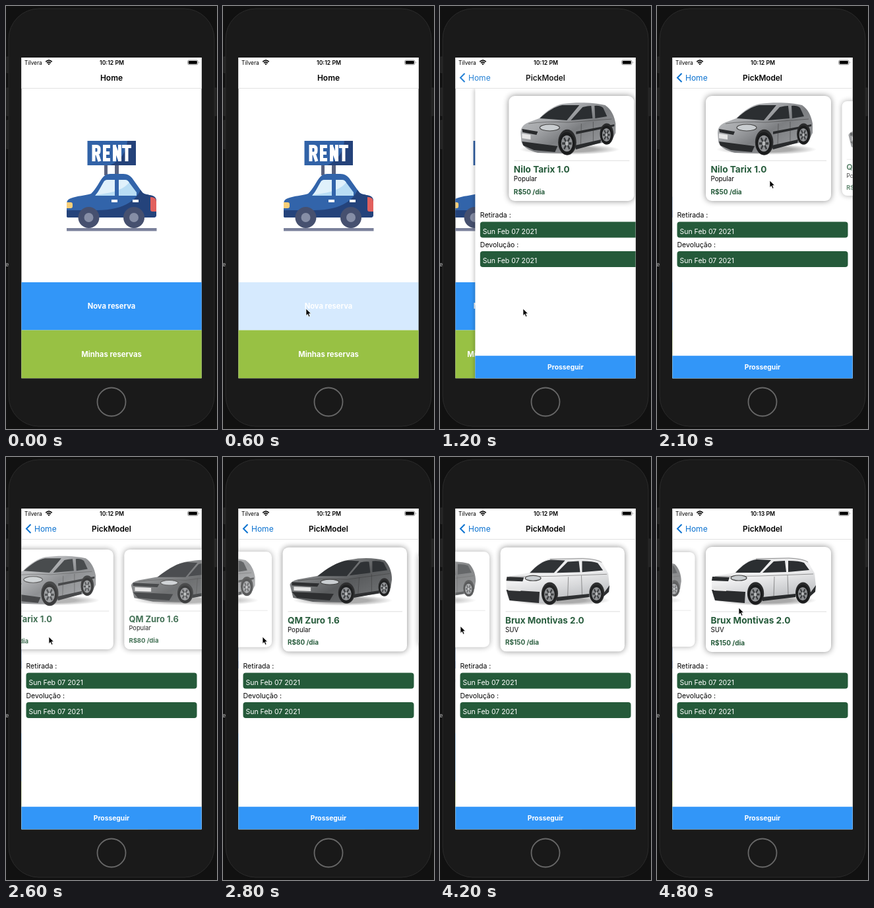
An HTML page for the animation above (5 s loop, 320 by 640 pixels).

```html
<!DOCTYPE html>
<html lang="pt">
<head>
<meta charset="utf-8">
<title>Car rental app</title>
<style>
html, body { margin: 0; width: 100%; height: 100%; overflow: hidden; background: #111; }
svg { display: block; width: 320px; height: 640px; }
text { font-family: Inter, "Liberation Sans", sans-serif; white-space: pre; }
.mid { text-anchor: middle; }
.semi { font-weight: 600; }
.bold { font-weight: 700; }
.green { fill: #255a3a; }
.white { fill: #fff; }
.card > rect { fill: #fff; filter: drop-shadow(0 0 5px #0007); }
#panel > .sheet { fill: #fff; filter: drop-shadow(-1px 0 3px #0004); }
</style>
</head>
<body>
<svg viewBox="0 0 320 640">
  <defs>
    <clipPath id="screen"><rect x="23.400" y="78" width="273.200" height="485.300"/></clipPath>
    <clipPath id="carBody"><path id="bodyShape" d="M92 318V299Q92 293 98 291C108 287 120 287 129 284C137 277 142 264 148 258Q152 254 158 254H178Q186 254 191 260L206 281Q208 284 213 285L222 287Q228 289 228 295V316Q228 320 224 320H95Q92 320 92 318Z"/></clipPath>
    <clipPath id="glass"><path d="M135 287C141 281 145 271 149 265Q151 263 154 263H165V287ZM171 263H180Q184 263 186 266L198 282V287H171Z"/></clipPath>
    <linearGradient id="paint0" x2=".9" y2=".8"><stop stop-color="#c4c6c8"/><stop offset=".4" stop-color="#a6a8ab"/><stop offset=".65" stop-color="#7c7e81"/><stop offset="1" stop-color="#96989b"/></linearGradient>
    <linearGradient id="paint1" x2=".9" y2=".8"><stop stop-color="#8e9092"/><stop offset=".4" stop-color="#77797b"/><stop offset=".65" stop-color="#56585a"/><stop offset="1" stop-color="#6b6d6f"/></linearGradient>
    <linearGradient id="paint2" x2=".4" y2="1"><stop stop-color="#e4e5e6"/><stop offset=".5" stop-color="#f0f0f1"/><stop offset="1" stop-color="#bdbfc2"/></linearGradient>
    <radialGradient id="ground"><stop offset=".5" stop-color="#aaa"/><stop offset="1" stop-color="#fff"/></radialGradient>
  </defs>

  <!-- phone -->
  <rect width="320" height="640" fill="#111"/>
  <g fill="#222" stroke="#303030" stroke-width=".7">
    <rect x="1" y="77" width="5" height="24"/><rect x="1" y="124" width="5" height="42"/>
    <rect x="1" y="173" width="5" height="43"/><rect x="314" y="124" width="5" height="42"/>
  </g>
  <rect x="4" y="4" width="312" height="632" rx="46" fill="#1a1a1a" stroke="#2b2b2b"/>
  <circle cx="160" cy="599" r="21.500" fill="#191919" stroke="#686868" stroke-width="1.800"/>
  <text x="-1" y="394" font-size="9" fill="#bbb">e</text>

  <g clip-path="url(#screen)">
    <rect x="23" y="78" width="274" height="486" fill="#fff"/>

    <g id="home">
      <path fill="#59627f" d="M149 240h5v16h-5zM165 240h6v16h-6z"/>
      <rect x="123.500" y="204" width="73.500" height="37" fill="#3162a7"/>
      <path fill="#24427a" d="M184 204H197V241H158Q182 230 184 204Z"/>
      <g role="img" aria-label="RENT" fill="none" stroke="#fff" stroke-width="5">
        <path d="M133 235V212.500H137.500Q141 212.500 141 216.500V219Q141 223 137.500 223H134M138 223L142 235M158 212.500H149.500V232.500H158M149.500 222.500H157M164.500 235V210M172.500 235V210M164 211L173 234M176 212.500H190M183 212V235"/>
      </g>
      <use href="#bodyShape" fill="#3264aa"/>
      <path clip-path="url(#carBody)" fill="#24437b" d="M92 309H138C180 309 203 292 206 270L230 280V322H92Z"/>
      <g clip-path="url(#glass)">
        <rect x="134" y="262" width="66" height="26" fill="#b9ddf4"/>
        <path fill="#e0f1fb" d="M134 262H190C181 279 160 283 134 286Z"/>
      </g>
      <path fill="#fff" d="M160 293h9v4h-9zM192 293h9v4h-9z"/>
      <path fill="#f8cf79" d="M92 297H98Q101 297 101 300V303Q101 306 98 306H92Z"/>
      <path fill="#e2605d" d="M219 289Q228 289 228 296V311H222Q219 311 219 308Z"/>
      <g fill="#46506f"><circle cx="125.500" cy="320" r="16"/><circle cx="194" cy="320" r="16"/></g>
      <g fill="#868ea6"><circle cx="125.500" cy="320" r="7"/><circle cx="194" cy="320" r="7"/></g>
      <rect x="92" y="336" width="136.500" height="4.500" fill="#7b819b"/>
      <g id="button">
        <rect x="23" y="418" width="274" height="72.500" fill="#3296f8"/>
        <text class="mid bold white" x="160" y="458" font-size="11.200">Nova reserva</text>
      </g>
      <rect x="23" y="490.500" width="274" height="73" fill="#98c144"/>
      <text class="mid bold white" x="160" y="531" font-size="11.300">Minhas reservas</text>
    </g>

    <g id="panel">
      <rect class="sheet" x="23" y="125" width="274" height="440"/>
      <g id="cards"></g>
      <g font-size="10.500">
        <text x="30.500" y="320">Retirada :</text>
        <rect class="green" x="30.500" y="326.500" width="259" height="24" rx="4"/>
        <text class="white" x="34.500" y="344.500">Sun Feb 07 2021</text>
        <text x="30.500" y="364.500">Devolução :</text>
        <rect class="green" x="30.500" y="371" width="259" height="24" rx="4"/>
        <text class="white" x="34.500" y="389">Sun Feb 07 2021</text>
      </g>
      <rect x="23" y="529.200" width="274" height="35" fill="#3296f8"/>
      <text class="mid bold white" x="160" y="550" font-size="10.300">Prosseguir</text>
    </g>

    <!-- header and status bar -->
    <rect x="23" y="78" width="274" height="47" fill="#fff"/>
    <path d="M23 124.500H297" stroke="#e2e2e2"/>
    <text x="28" y="88.500" font-size="8.400">Tilvera</text>
    <path d="M60.300 84.300Q65 79.800 69.700 84.300M62.100 86.300Q65 83.500 67.900 86.300" fill="none" stroke="#000" stroke-width="1.700"/>
    <path d="M63.300 87.500Q65 86 66.700 87.500L65 89.300Z"/>
    <text id="clock" class="mid semi" x="160.500" y="88.500" font-size="8.700"></text>
    <rect x="275.500" y="82" width="15.500" height="6.800" rx="2" fill="none" stroke="#888" stroke-width=".8"/>
    <rect x="276.700" y="83.100" width="13.100" height="4.600" rx="1"/>
    <path d="M292.500 84Q294 85.400 292.500 86.800Z" fill="#777"/>
    <text id="homeTitle" class="mid semi" x="160" y="113" font-size="12">Home</text>
    <g id="pickTitle">
      <text class="mid semi" x="160" y="113" font-size="11.800">PickModel</text>
      <path d="M37.500 102L31 108.500L37.500 115" fill="none" stroke="#0b72d0" stroke-width="2"/>
      <text x="43" y="113" font-size="12" fill="#0b72d0">Home</text>
    </g>
    <path id="cursor" d="M0 0V10.500L2.400 8.300L4.200 12.200L6 11.400L4.300 7.600H7.500Z" stroke="#fff" stroke-width=".7"/>
  </g>
</svg>
<script>
const $ = id => document.getElementById(id);

// wheels: cx, cy, rx, ry; lamp: centre of the near headlight
const models = [
  { name: "Nilo Tarix 1.0", kind: "Popular", price: 50,
    body: "M92 192C92 184 96 179 104 176L120 170C132 158 144 150 156 148C178 145 204 146 220 150C229 156 234 166 236 178V192L230 204L182 214L160 223L118 222C104 219 94 212 93 205Z",
    glass: "M121 170C133 159 144 152 155 150L181 150L162 173ZM168 173L186 153Q194 151 199 151L201 170ZM204 151Q212 150 217 154L223 167L205 170Z",
    trim: "M94 186L118 190L116 195L95 191ZM94 205L148 212L144 221L112 218L96 211ZM174 211L214 202L213 207L176 217ZM176 190L234 179V182L176 194Z",
    seam: "M104 178Q130 174 164 176L230 171M184 178L183 211M202 175V206",
    lamp: [136, 184, 15, 5], plate: "M94 193l13 2v7l-13-2z", wheels: [[162, 208, 12, 17], [222, 195, 9, 14]] },
  { name: "QM Zuro 1.6", kind: "Popular", price: 80,
    body: "M85 193Q86 188 97 185L131 179C146 166 160 157 176 155C196 151 216 152 230 156C238 164 241 175 241 185L239 198L226 206L184 212L168 220L120 219L90 213Z",
    glass: "M127 180C142 168 157 158 174 156L191 157L172 180ZM176 179L193 159Q201 157 206 158L208 175ZM211 157Q221 156 228 159L234 171L211 174Z",
    trim: "M88 189L130 191L127 196L88 194ZM88 204L152 207L146 217L96 213ZM181 208L222 202L221 206L183 213Z",
    seam: "M97 187Q130 182 172 185L238 176M191 182L189 210M210 177V206",
    lamp: [146, 189, 14, 4], plate: "M91 196l26 1v6l-26-1z", wheels: [[171, 207, 11, 14], [229, 198, 8, 12]] },
  { name: "Brux Montivas 2.0", kind: "SUV", price: 150,
    body: "M83 188L87 180L118 175C128 164 138 156 150 153L200 152Q222 153 229 158L239 176L241 196L233 210L165 216L140 221L88 217Q82 206 83 188Z",
    glass: "M119 175C129 164 140 156 151 155L173 156L156 175ZM160 175L177 158L194 157L196 174ZM199 157Q216 157 223 160L231 171L199 174Z",
    trim: "M84 181L110 182L108 188L83 187ZM83 201L134 204L133 221L88 217ZM160 212L210 207V212L160 218ZM232 206L241 194L240 204L232 211Z",
    seam: "M88 181L155 180L237 177M178 181L177 211M198 179L199 208M150 154L200 153Q222 154 229 159",
    lamp: [124, 183, 12, 4], plate: "M86 196l19 1v6l-19-1z", wheels: [[149, 208, 11, 15], [221, 207, 10, 14]] }
];

const wheel = ([x, y, rx, ry]) =>
  `<g transform="translate(${x} ${y}) scale(${rx} ${ry})">
    <circle cx=".05" cy="-.1" r="1.150" fill="#2a2b2c"/>
    <circle r="1" fill="#1b1c1d"/>
    <circle r=".72" fill="#8f9194"/>
    <path d="M-.6 0H.6M-.35 -.5L.35 .5M.35 -.5L-.35 .5" stroke="#3a3c3e" stroke-width=".2"/>
    <circle r=".2" fill="#b5b7b9"/>
  </g>`;

$("cards").innerHTML = models.map((m, i) => {
  const [x, y, rx, ry] = m.lamp;
  return `<g class="card">
    <rect x="74" y="136" width="190" height="159" rx="9"/>
    <ellipse cx="166" cy="217" rx="76" ry="8" fill="url(#ground)"/>
    <path d="${m.body}" fill="url(#paint${i})"/>
    <path d="${m.glass}" fill="#2b2e31"/>
    <path d="${m.trim}" fill="#292b2d"/>
    <path d="${m.seam}" fill="none" stroke="#3338" stroke-width=".9"/>
    <ellipse cx="${x}" cy="${y}" rx="${rx}" ry="${ry}" fill="#c9cdd0" stroke="#444" stroke-width="1.200"/>
    <path d="${m.plate}" fill="#e6e6e6"/>
    ${m.wheels.map(wheel).join("")}
    <path d="M82 234H257" stroke="#ddd"/>
    <text class="bold green" x="81.500" y="252" font-size="13.600">${m.name}</text>
    <text x="81.500" y="265" font-size="9.800">${m.kind}</text>
    <text class="bold green" x="81.500" y="285" font-size="10">R$${m.price} /dia</text>
  </g>`;
}).join("");
const cards = [...$("cards").children];

const pointer = [[100, 210, 212], [300, 180, 330], [500, 126, 458], [1200, 126, 458], [1500, 136, 428],
  [2100, 171, 264], [2400, 171, 264], [2500, 150, 267], [2600, 65, 272], [2800, 60, 272], [3000, 82, 274],
  [3100, 190, 258], [3400, 190, 258], [3500, 203, 255], [3600, 205, 254], [3800, 205, 254],
  [3900, 185, 255], [4000, 120, 256], [4200, 31, 256], [4400, 31, 256], [4800, 124, 228]];
const swipe = [[2400, 0], [2500, .1], [2600, .49], [2700, .78], [2800, .92], [2900, .98], [3000, 1],
  [3800, 1], [3900, 1.09], [4000, 1.42], [4100, 1.74], [4200, 1.915], [4300, 1.98], [4400, 2]];
const press = [[450, 1], [550, .2], [800, .2], [960, 1]];

// linear interpolation along rows of [time, ...values]
function track(keys, t) {
  const n = keys.findIndex(k => k[0] > t);
  if (n === 0) return keys[0].slice(1);
  if (n < 0) return keys.at(-1).slice(1);
  const a = keys[n - 1], b = keys[n], f = (t - a[0]) / (b[0] - a[0]);
  return a.slice(1).map((v, i) => v + (b[i + 1] - v) * f);
}

const move = (el, x, y = 0) => el.setAttribute("transform", `translate(${x} ${y})`);

function draw(t) {
  const push = t < 700 ? 0 : t >= 2000 ? 1 : 1 - Math.exp((650 - t) / 250);
  move($("home"), -82 * push);
  move($("panel"), 274 * (1 - push));
  $("panel").style.display = push ? "" : "none";
  $("homeTitle").style.opacity = Math.max(0, 1 - 2 * push);
  $("pickTitle").style.opacity = push;
  $("button").style.opacity = track(press, t)[0];
  $("clock").textContent = t < 4600 ? "10:12 PM" : "10:13 PM";

  const [page] = track(swipe, t);
  cards.forEach((card, i) => {
    const away = Math.min(1, Math.abs(i - page));
    card.setAttribute("transform",
      `translate(${169 + 197 * (i - page)} 215.500) scale(${1 - .1 * away}) translate(-169 -215.500)`);
    card.style.opacity = 1 - .3 * away;
  });

  move($("cursor"), ...track(pointer, t));
  $("cursor").style.display = t < 100 ? "none" : "";
}

function tick() {
  draw(Math.floor(performance.now() % 5000 / 100) * 100);
  requestAnimationFrame(tick);
}
tick();
</script>
</body>
</html>
```
